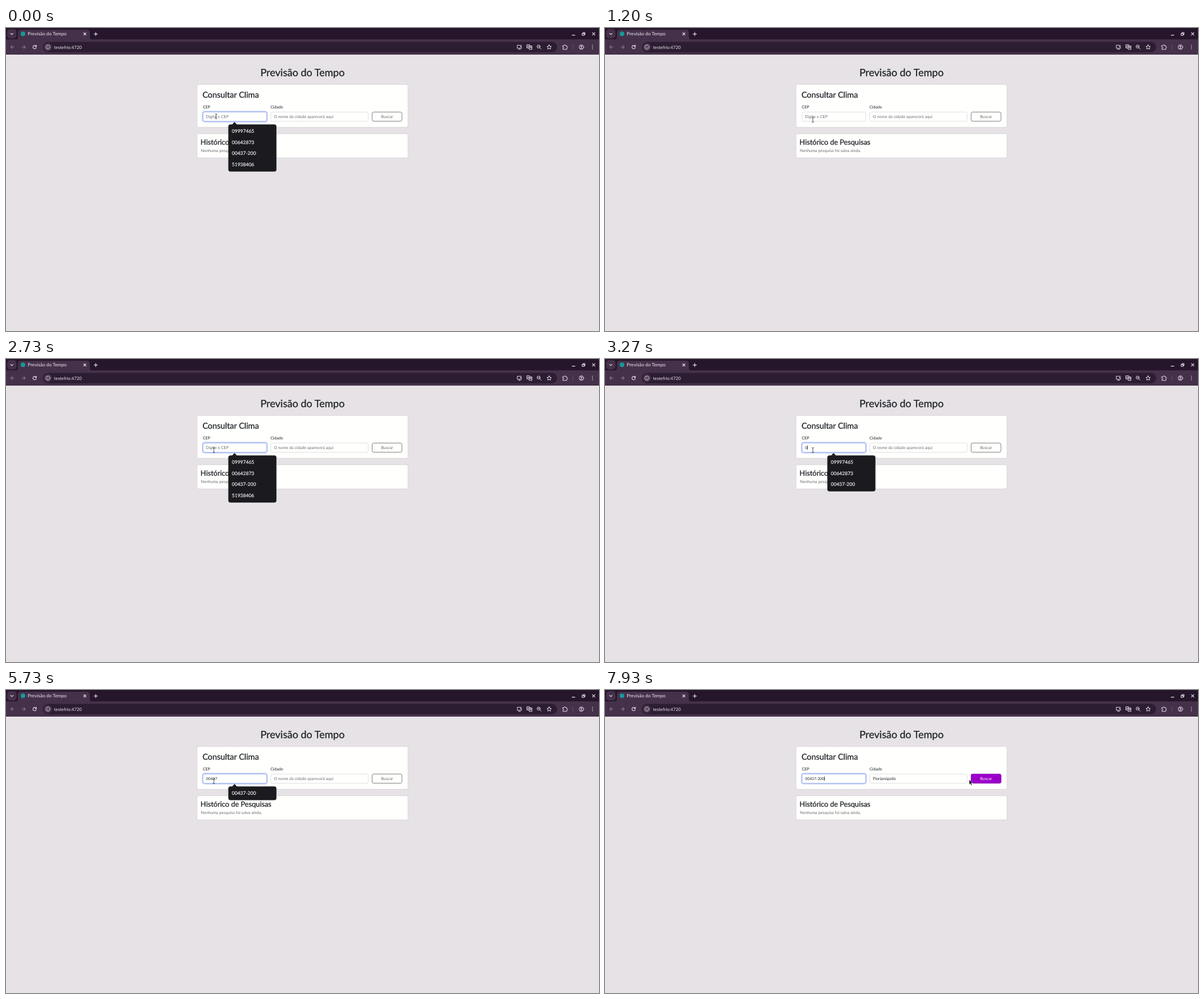
An HTML page that plays this animation: 1047x535 px, repeating every 8 s.

```html
<!DOCTYPE html>
<html lang="pt-BR">
<head>
<meta charset="utf-8">
<title>Previsão do Tempo</title>
<style>
  html, body { margin: 0; width: 100%; height: 100%; overflow: hidden; background: #e6e2e6; }
  svg { display: block; width: 100vw; height: 100vh; }
  text { font-family: Lato, "Open Sans", sans-serif; font-size: 7.2px; fill: #212529; text-rendering: geometricPrecision; white-space: pre; }
  .head { stroke: #212529; stroke-width: .3px; }
  .ui { fill: #eee6f0; }
  .hint { fill: #6a6e73; }
  .num { font-size: 6.75px; }
  .row { font-size: 8.5px; fill: #eeecf0; stroke: #eeecf0; stroke-width: .2px; }
  .line { fill: none; stroke: #e9dfec; stroke-width: 1.1; stroke-linecap: round; stroke-linejoin: round; }
  .dim { stroke: #8a7890; }
  .card { fill: #fffffd; stroke: #d2ced3; stroke-width: .8; }
  .field { fill: #fffffd; stroke: #dcdde1; stroke-width: .9; }
</style>
</head>
<body>
<svg viewBox="0 0 1047 535">
  <rect width="1047" height="535" fill="#e6e2e6"/>

  <!-- window bar and tab -->
  <rect width="1047" height="21" fill="#26162b"/>
  <rect y="20" width="1047" height="27" fill="#45314a"/>
  <rect x="2" y="2" width="16.5" height="16.5" rx="5" fill="#45314a"/>
  <path class="line" d="M8 9.3l2.3 2.3 2.3-2.3"/>
  <path d="M16 20.5q5 0 5-5V8q0-5 5-5H143q5 0 5 5v7.5q0 5 5 5z" fill="#45314a"/>
  <circle cx="30" cy="10.3" r="4" fill="#16999b"/>
  <text class="ui" x="38.3" y="13.4" style="font-size:8.34px">Previsão do Tempo</text>
  <path class="line" d="M137.2 8.5l4 4m0-4l-4 4M158.5 7.6v6m-3-3h6"/>
  <path class="line" d="M999.5 12.6h5M1035.4 8.2l4.4 4.4m0-4.4l-4.4 4.4M1017.2 9.6h3.6v3.4h-3.6zM1018.8 9.4V8h3.4v3.6h-1.2"/>

  <!-- toolbar -->
  <rect x="65" y="24.5" width="908" height="18.5" rx="9.2" fill="#2c1d32"/>
  <path class="line dim" d="M14.5 33.7h-6m2.7-2.7l-2.7 2.7 2.7 2.7M28 33.7h6m-2.7-2.7l2.7 2.7-2.7 2.7"/>
  <path class="line" d="M53.2 32.2a3 3 0 1 0 .3 2.2M53.6 30.4v2.2h-2.2"/>
  <circle cx="74" cy="33.7" r="7.2" fill="#45314a"/>
  <circle class="line" cx="74" cy="33.7" r="3.7" style="stroke-width:.9"/>
  <path class="line" d="M74 33.5v2M74 31.8v.1" style="stroke-width:.9"/>
  <text class="ui" x="84.8" y="36.5" style="font-size:7.8px">testefrio:4720</text>
  <g class="line" style="stroke-width:1">
    <path d="M907 30.4h-4.2v5.4h7.4v-1.6M905 37.6h3.4M909 29.8v3.6m-1.6-1.5l1.6 1.6 1.6-1.6"/>
    <path d="M920 29.6h4.6v5.6H920zM924.8 31.6h3.8v6.2h-4.8l-.6-2.4M921.2 33.6l1.1-2.4 1.1 2.4M925.8 33.4h1.8m-.9 0v2.4"/>
    <circle cx="940.4" cy="32.8" r="2.7"/>
    <path d="M942.5 35l2.4 2.4M939.3 32.8h2.2"/>
    <path d="M959 29.7l1.2 2.6 2.8.3-2.1 1.9.6 2.8-2.5-1.4-2.5 1.4.6-2.8-2.1-1.9 2.8-.3z"/>
    <path d="M983.3 31.2h2.2q0-1.6 1.2-1.6t1.2 1.6h2.2v2.2q1.5 0 1.5 1.1t-1.5 1.1v2.2h-6.8v-2.2q1.5 0 1.5-1.1t-1.5-1.1z"/>
    <circle cx="1016" cy="33.7" r="4"/>
    <circle cx="1016" cy="32.5" r="1.3"/>
    <path d="M1013.3 36.4q2.7-2.2 5.4 0"/>
    <path d="M1035.5 30.5v.1m0 3v.1m0 3v.1" style="stroke-width:1.5"/>
  </g>
  <path d="M1001 29v9.5" stroke="#6a5570" stroke-width=".9"/>

  <!-- page -->
  <text class="head" x="523.5" y="84.8" text-anchor="middle" style="font-size:18px">Previsão do Tempo</text>
  <rect class="card" x="337.2" y="99.7" width="372.6" height="75.7" rx="2.8"/>
  <text class="head" x="346.9" y="123.2" style="font-size:14.4px">Consultar Clima</text>
  <text x="347.4" y="142.2">CEP</text>
  <text x="467" y="142.2">Cidade</text>
  <rect class="field" x="347.9" y="148.3" width="112.4" height="16.4" rx="2.8"/>
  <g id="ring">
    <rect x="346.9" y="147.3" width="114.4" height="18.4" rx="3.8" fill="none" stroke="#c3cffa" stroke-width="1.9"/>
    <rect x="347.9" y="148.3" width="112.4" height="16.4" rx="2.8" fill="#fffffd" stroke="#93aaf0" stroke-width=".9"/>
  </g>
  <rect id="mark" x="353" y="152.2" width="39.6" height="8.4" fill="#4a33c4"/>
  <text id="cepHint" class="hint" x="353.1" y="158.9">Digite o CEP</text>
  <text id="cep" class="num" x="353.3" y="158.9"></text>
  <rect id="caret" y="152.6" width=".8" height="7.8" fill="#212529"/>
  <rect class="field" x="467.5" y="148.3" width="172" height="16.4" rx="2.8"/>
  <text id="city" x="473" y="158.9"></text>
  <g id="button">
    <rect x="646.4" y="148.4" width="52.7" height="16.2" rx="2.8" fill="#fffffd" stroke="#212529" stroke-width=".9"/>
    <rect id="paint" x="646" y="148" width="53.5" height="17" rx="3" fill="#9b00c9"/>
    <text id="label" x="672.8" y="158.9" text-anchor="middle">Buscar</text>
  </g>
  <rect class="card" x="337.2" y="186.7" width="372.6" height="42.7" rx="2.8"/>
  <text class="head" x="343.6" y="205.6" style="font-size:12.7px">Histórico de Pesquisas</text>
  <text class="hint" x="344" y="219.4">Nenhuma pesquisa foi salva ainda.</text>

  <g id="popup">
    <path d="M398.8 170.8l4.7-4.8 4.7 4.8z" fill="#1b1b1f"/>
    <rect id="panel" x="392.5" y="170.2" width="85" rx="4" fill="#1b1b1f"/>
    <g id="rows"></g>
  </g>

  <path id="arrow" d="M0 0V9.2L2.1 7.3 3.6 10.5 5.1 9.8 3.6 6.7H6.3Z" fill="#161418" stroke="#f2f0f2" stroke-width=".6"/>
  <path id="beam" d="M-1.9-4.4Q0-4.4 0-3.4Q0-4.4 1.9-4.4M0-3.6V3.6M-1.9 4.4Q0 4.4 0 3.4Q0 4.4 1.9 4.4" fill="none" stroke="#3a383c" stroke-width=".9"/>
</svg>
<script>
const $ = id => document.getElementById(id);
const LOOP = 8000, TICK = 1000 / 15;
const CODES = ["09997465", "00642873", "00437-200", "51938406"];
const ENTRY = CODES[2];
const KEYS = [3270, 3400, 3800, 4200, 5130, 5870, 6270, 6530, 6730];
const ROWS = [[0, 4], [670, 0], [1930, 4], [3270, 3], [3470, 2], [3870, 1], [6730, 0]];
const CARET = [[2200, 2730], [3270, 4800], [5130, 5730], [5870, 7330], [7930, LOOP]];
// time, x, y, pointer shape
const PATH = [
  [0, 371, 156, "beam"], [70, 371, 156, "beam"], [133, 364, 160, "beam"],
  [200, 346, 166, "arrow"], [267, 322, 165, "arrow"], [333, 306, 161, "arrow"],
  [400, 302, 159, "arrow"], [865, 302, 159, "arrow"], [1000, 328, 160, "arrow"],
  [1066, 347, 161, "beam"], [1200, 367, 162, "beam"], [1934, 367, 162, "beam"],
  [2000, 367, 161, "beam"], [7265, 367, 161, "beam"], [7333, 378, 167, "arrow"],
  [7400, 412, 179, "arrow"], [7466, 470, 182, "arrow"], [7533, 535, 177, "arrow"],
  [7600, 588, 168, "arrow"], [7666, 619, 161, "beam"], [7865, 619, 161, "beam"],
  [7932, 643, 158, "arrow"], [LOOP, 643, 158, "arrow"]
];

const last = (list, t) => list.filter(e => e[0] <= t).pop();
const ramp = (t, start, length) => {
  const p = Math.min(1, Math.max(0, (t - start) / length));
  return p * p * (3 - 2 * p);
};
const show = (id, on) => $(id).setAttribute("visibility", on ? "visible" : "hidden");
const setText = (id, value) => { if ($(id).textContent !== value) $(id).textContent = value; };

const rows = CODES.map((_, i) => {
  const el = document.createElementNS("http://www.w3.org/2000/svg", "text");
  el.setAttribute("class", "row");
  el.setAttribute("x", 398.8);
  el.setAttribute("y", 185.1 + 19.65 * i);
  $("rows").append(el);
  return el;
});

function drawPointer(t) {
  const i = Math.max(0, PATH.findIndex(p => p[0] > t) - 1);
  const [t0, x0, y0, shape] = PATH[i], [t1, x1, y1] = PATH[i + 1];
  const p = (t - t0) / (t1 - t0);
  for (const id of ["arrow", "beam"]) show(id, id === shape);
  $(shape).setAttribute("transform", `translate(${x0 + (x1 - x0) * p} ${y0 + (y1 - y0) * p})`);
}

function drawPopup(t, typed) {
  const count = last(ROWS, t)[1];
  const matches = CODES.filter(c => c.startsWith(typed));
  // the list lags one tick behind the keyboard
  const shown = matches.length < count ? CODES.filter(c => c.startsWith(typed.slice(0, -1))) : matches;
  $("popup").style.display = count ? "" : "none";
  $("panel").setAttribute("height", 4.7 + 19.65 * count);
  rows.forEach((el, i) => { el.textContent = i < count ? shown[i] : ""; });
}

function draw(time) {
  const t = time % LOOP;
  const tick = Math.floor((t + 4) / TICK) * TICK;
  const typed = ENTRY.slice(0, KEYS.filter(k => k <= t).length);
  const ready = t >= 6730, marked = t >= 1930 && t < 2000;

  $("ring").style.opacity = t < 1930 ? 1 - ramp(tick, 667, 200) : ramp(tick, 1934, 200);
  show("mark", marked);
  $("cepHint").style.fill = marked ? "#fff" : "";
  show("cepHint", !typed);
  setText("cep", typed);
  show("caret", CARET.some(([a, b]) => t >= a && t < b));
  $("caret").setAttribute("x", 353.2 + (typed ? $("cep").getComputedTextLength() : 0));

  setText("city", ready ? "Florianópolis" : "O nome da cidade aparecerá aqui");
  $("city").style.fill = ready ? "#212529" : "#6a6e73";
  const glow = ramp(tick, 6734, 190), tone = Math.round(33 + 215 * glow);
  $("button").style.opacity = ready ? 1 : .65;
  $("paint").style.opacity = glow;
  $("label").style.fill = `rgb(${tone},${tone},${tone})`;

  drawPopup(t, typed);
  drawPointer(Math.min(LOOP - 1, tick));
}

const start = performance.now();
function loop() {
  draw(performance.now() - start);
  requestAnimationFrame(loop);
}
loop();
</script>
</body>
</html>
```
